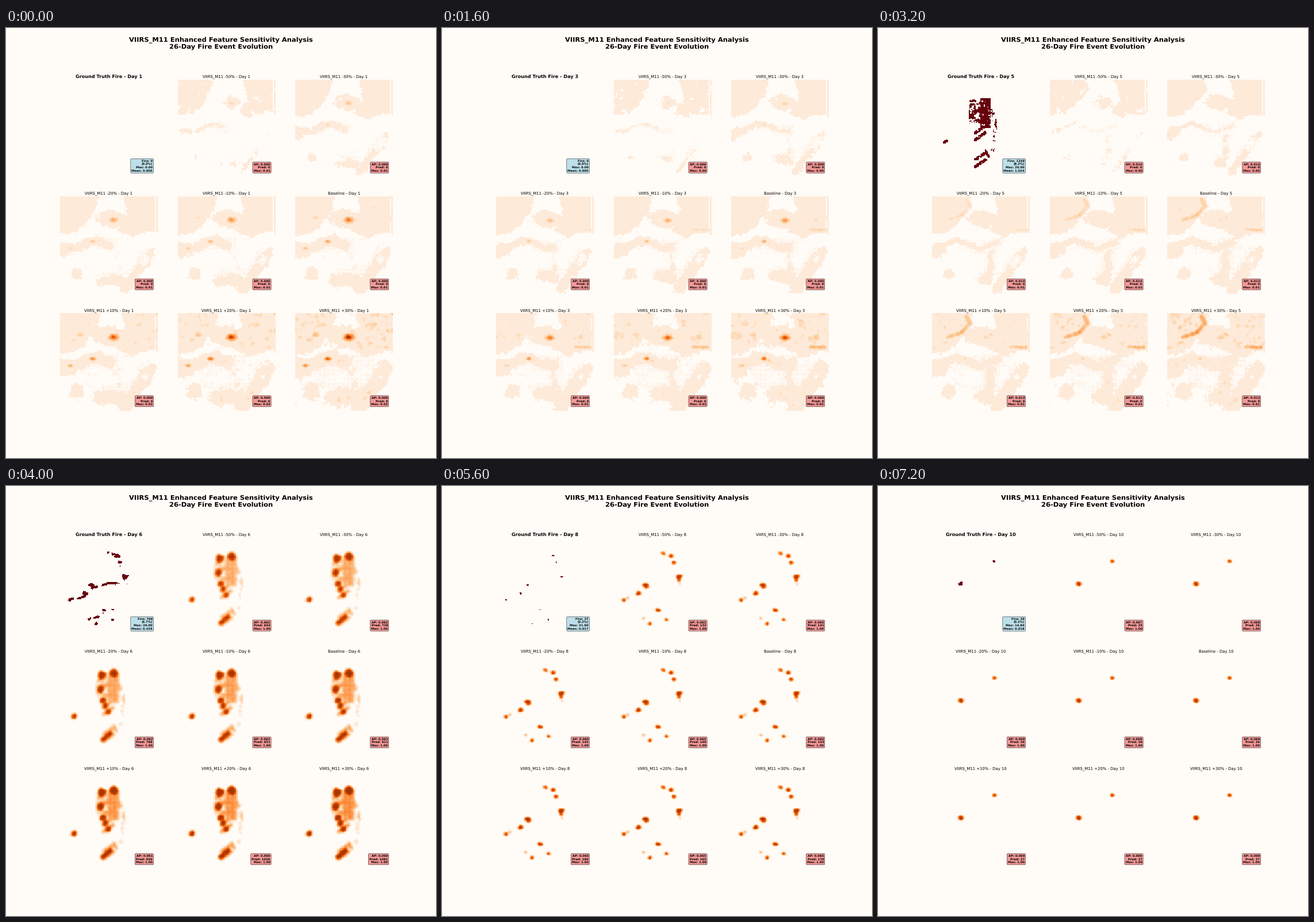
Write a matplotlib script that moves like this. It is 748 by 748 pixels and loops after 8 s.

```python
import numpy as np
import matplotlib.pyplot as plt
from matplotlib.animation import FuncAnimation
from matplotlib.colors import ListedColormap

plt.rcParams["text.hinting"] = "no_hinting"

SIZE, N, DAYS = 748, 128, 10
SPAN = 169.4  # panel width in pixels; all shapes use this scale
BG, LIGHT = "#fffbf6", "#feead9"
SHIFTS = [-50, -30, -20, -10, 0, 10, 20, 30]
GAIN = [.35, .5, .68, .82, 1, 1.2, 1.4, 1.6]
CUTOFF = np.interp(SHIFTS, [-50, -20, 30], [.82, .55, .27])

ramp = plt.get_cmap("Oranges")
HEAT = ListedColormap([BG] * 2 + [LIGHT] * 3 + [ramp(i / 32) for i in range(5, 32)])
FIRE = ListedColormap([BG, "#67000d"])

axis = (np.arange(N) + 0.5) * SPAN / N
X, Y = np.meshgrid(axis, axis)
even = np.arange(N) % 2 == 0
LATTICE = even[:, None] & even[None, :]

# Values printed in the corner boxes
FIRE_STATS = {5: (1348, 8.2, 20, 1.024), 6: (766, 4.7, 20, .428), 7: (195, 1.2, 21, .109),
              8: (37, .2, 21, .017), 9: (36, .2, 14, .016), 10: (39, .2, 14.84, .018)}
PRED = {6: [644, 738, 788, 851, 911, 959, 1020, 1081],
        7: [149, 172, 182, 191, 205, 224, 234, 248],
        8: [132, 141, 145, 149, 153, 160, 165, 170],
        9: range(28, 36),
        10: [25] + [26] * 4 + [27] * 3}
AP = {5: [.014] * 4 + [.013] * 4, 6: [.062] * 5 + [.061, .060, .060],
      7: [.066] + [.067] * 7, 8: [.063] + [.065] * 7,
      9: [.066] + [.067] * 7, 10: [.067, .068] + [.069] * 6}

# Fire geography: perimeter paths, then lasting hot spots (x, y, radius)
RIM = [[(84, 27), (102, 33), (104, 46), (110, 68), (115, 80)],
       [(14, 108), (40, 104), (56, 88), (84, 80), (102, 81)],
       [(50, 142), (66, 138), (76, 128), (92, 126)]]
HUBS = [(99, 32, 4), (104, 44, 3), (113, 69, 5), (55, 83, 4), (43, 97, 4),
        (17, 109, 3), (76, 126, 2.5), (91, 143, 2.5), (63, 150, 2.5)]
EMBERS = [(50, 81, 3.2), (108, 42, 2.2)]
FRONTS = [(73, 38), (93, 34), (70, 62), (74, 81), (78, 91), (83, 100), (24, 108)]


def blur(a, sigma):
    i = np.arange(N)
    k = np.exp(-0.5 * ((i[:, None] - i[None, :]) / sigma) ** 2)
    k /= k.sum(axis=1, keepdims=True)
    return k @ a @ k.T


def noise(seed, sigma):
    n = blur(np.random.default_rng(seed).normal(size=(N, N)), sigma)
    return n / n.std()


def rank(seed, sigma):
    order = noise(seed, sigma).ravel().argsort().argsort()
    return order.reshape(N, N) / N**2


def distance(*points):
    """Distance of every cell from a point or a polyline."""
    best = np.hypot(X - points[0][0], Y - points[0][1])
    for (x1, y1), (x2, y2) in zip(points, points[1:]):
        dx, dy = x2 - x1, y2 - y1
        s = np.clip(((X - x1) * dx + (Y - y1) * dy) / (dx * dx + dy * dy), 0, 1)
        best = np.minimum(best, np.hypot(X - x1 - s * dx, Y - y1 - s * dy))
    return best


def oval(x, y, rx, ry):
    return (1 - np.hypot((X - x) / rx, (Y - y) / ry)) * min(rx, ry)


def first_burn():
    grain = rank(5, 0.8)
    out = (np.abs(X - 93) < 9) & (np.abs(Y - 59) < 26) & (grain < .92)
    out |= (distance((71, 40), (69, 72)) < 6) & (grain < .65)
    out |= (distance((80, 40), (80, 72)) < 5) & (grain < .5)
    out |= (distance((104, 54), (110, 80), (105, 124)) < 3) & (grain < .3)
    for y in (87, 99, 134, 146):
        out |= (distance((92, y - 6), (75, y + 6)) < 2.8) & (grain < .85)
    out |= distance((93, 124), (98, 134)) < 2
    out |= distance((21, 109), (25, 107)) < 2.4
    return out


def burn(day):
    if day < 5:
        return np.zeros((N, N), bool)
    if day == 5:
        return first_burn()
    hubs, fade = (EMBERS, 1) if day > 8 else (HUBS, {6: .9, 7: .7, 8: .42}[day])
    wobble = 1 + 0.15 * noise(day, 1)
    out = np.zeros((N, N), bool)
    for x, y, r in hubs:
        out |= np.hypot((X - x) / 1.25, (Y - y) * 1.1) < r * fade * wobble
    if day < 8:
        patch = rank(day + 40, 1.6)
        for path in RIM:
            out |= (distance(*path) < 2.3 * fade) & (patch < (.55 if day == 6 else .12))
    return out


def spread(day):
    """Forecast heat, which follows the previous day's fire."""
    seen = burn(day - 1).astype(float)
    if day > 6:
        return blur(seen, 1.3)
    front = distance((74, 149), (88, 137)) < 2.6
    radius = (7 - Y / 30) * (1 + 0.15 * noise(61, 1.5))
    for point in FRONTS:
        front |= distance(point) < radius
    return blur(np.maximum(front, 0.24 * seen), 1.6) * (1.1 - 0.35 * LATTICE)


def peak(day):
    return .007 + .0076 * np.exp((1 - day) / 1.9)


def terrain(day):
    """Likelihood of a faint response; age drifts the shapes from day to day."""
    age = (day - 1) / 4
    band = 85 + 7 * np.sin(X / 13 + 1.5 * age)
    shapes = [
        np.minimum(66 - 0.0095 * Y**2 - X, 67 - Y),
        np.minimum(X - 106 - 7 * np.sin(Y / 14), 66 + 4 * np.sin(X / 9) - Y),
        oval(92, 41, 30, 15),
        np.minimum(8 - 3 * age - np.abs(Y - band), 92 + 26 * age - X),
        oval(6, 95, 18, 12),
        np.minimum(9 - distance((158, 97), (142, 120), (110, 164)), -oval(147, 110, 7, 9)),
        oval(92, 147 - 28 * age * (1 - age), 28 - 14 * age, 11),
        10 * age - 4 - distance((101, 98), (101, 136)),
        oval(29, 136, 11, 9),
    ]
    t = 1 / (1 + np.exp(-np.max(shapes, axis=0) / 5))
    t += 0.07 * noise(4, 2.5) + 0.06 * noise(day, 1) + 0.04 * LATTICE
    t += 0.2 * LATTICE * (oval(95, 105, 60, 34) > 0)
    t[:58, 124:126] *= 0.4
    return t


def simmer(day, t):
    age = (day - 1) / 4
    fade = 1 - 0.7 * age**1.6
    heat = (0.085 + 0.025 * noise(day + 20, 2)) * np.clip(t, 0, 1)
    for x, y, r, amp in [(93, 42, 8, .56), (57, 79, 5, .5), (18, 91, 5, .32), (36, 37, 8, .2)]:
        bump = np.exp(-((X - x) / r / 1.2) ** 2 - ((Y - y) / r / 0.8) ** 2)
        heat = np.maximum(heat, amp * fade * bump)
    crest = distance((60, 6), (65, 18), (52, 33), (28, 41))
    edge = distance((138, 59), (162, 59))
    heat = np.maximum(heat, 0.3 * age**2 * np.exp(-(crest / 5) ** 2))
    heat = np.maximum(heat, (0.13 + 0.14 * age) * np.exp(-(edge / 5) ** 2))
    return heat * (0.92 + 0.14 * LATTICE + 0.13 * noise(day + 30, 1.5))


def predictions(day):
    if day > 5:
        heat = spread(day)
        width = 0.3 if day == 6 else 0.12
        return [1 - np.exp(-2.6 * heat * (1 + width * (g - 1))) for g in GAIN]
    t = terrain(day)
    heat = simmer(day, t)
    return [np.maximum(0.1 * (t > c), heat * g) for g, c in zip(GAIN, CUTOFF)]


def show(day):
    fire, share, top, mean = FIRE_STATS.get(day, (0, 0, 0, 0))
    images[0].set_data(burn(day))
    axes[0].set_title(f"Ground Truth Fire - Day {day}", fontsize=14, fontweight="bold")
    notes[0].set_text(f"Fire: {fire}\n({share:.1f}%)\nMax: {top:.2f}\nMean: {mean:.3f}")
    aps, preds = AP.get(day, [0] * 8), PRED.get(day, [0] * 8)
    for i, field in enumerate(predictions(day)):
        most = peak(day) * GAIN[i] if day < 6 else 1 - .01 * (day == 7 and i < 3)
        name = f"VIIRS_M11 {SHIFTS[i]:+d}%" if SHIFTS[i] else "Baseline"
        images[i + 1].set_data(np.clip(field, 0, 0.89))
        axes[i + 1].set_title(f"{name} - Day {day}", fontsize=12)
        notes[i + 1].set_text(f"AP: {aps[i]:.3f}\nPred: {preds[i]}\nMax: {most:.2f}")


fig, grid = plt.subplots(3, 3, figsize=(18, 18), dpi=SIZE / 18, facecolor=BG)
fig.suptitle("VIIRS_M11 Enhanced Feature Sensitivity Analysis\n26-Day Fire Event Evolution",
             fontsize=20, fontweight="bold")
axes = grid.ravel()
images, notes = [], []
for i, ax in enumerate(axes):
    ax.axis("off")
    images.append(ax.imshow(np.zeros((N, N)), cmap=HEAT if i else FIRE,
                            vmin=0, vmax=1, interpolation="nearest"))
    box = dict(boxstyle="round", facecolor="lightcoral" if i else "lightblue", alpha=0.8)
    notes.append(ax.text(0.95, 0.05, "", transform=ax.transAxes, fontsize=9,
                         fontweight="bold", ha="right", va="bottom", bbox=box))


def update(k):
    show(k + 1)
    return images + notes


anim = FuncAnimation(fig, update, frames=DAYS, interval=800, repeat=True, blit=False)
plt.show()
```
